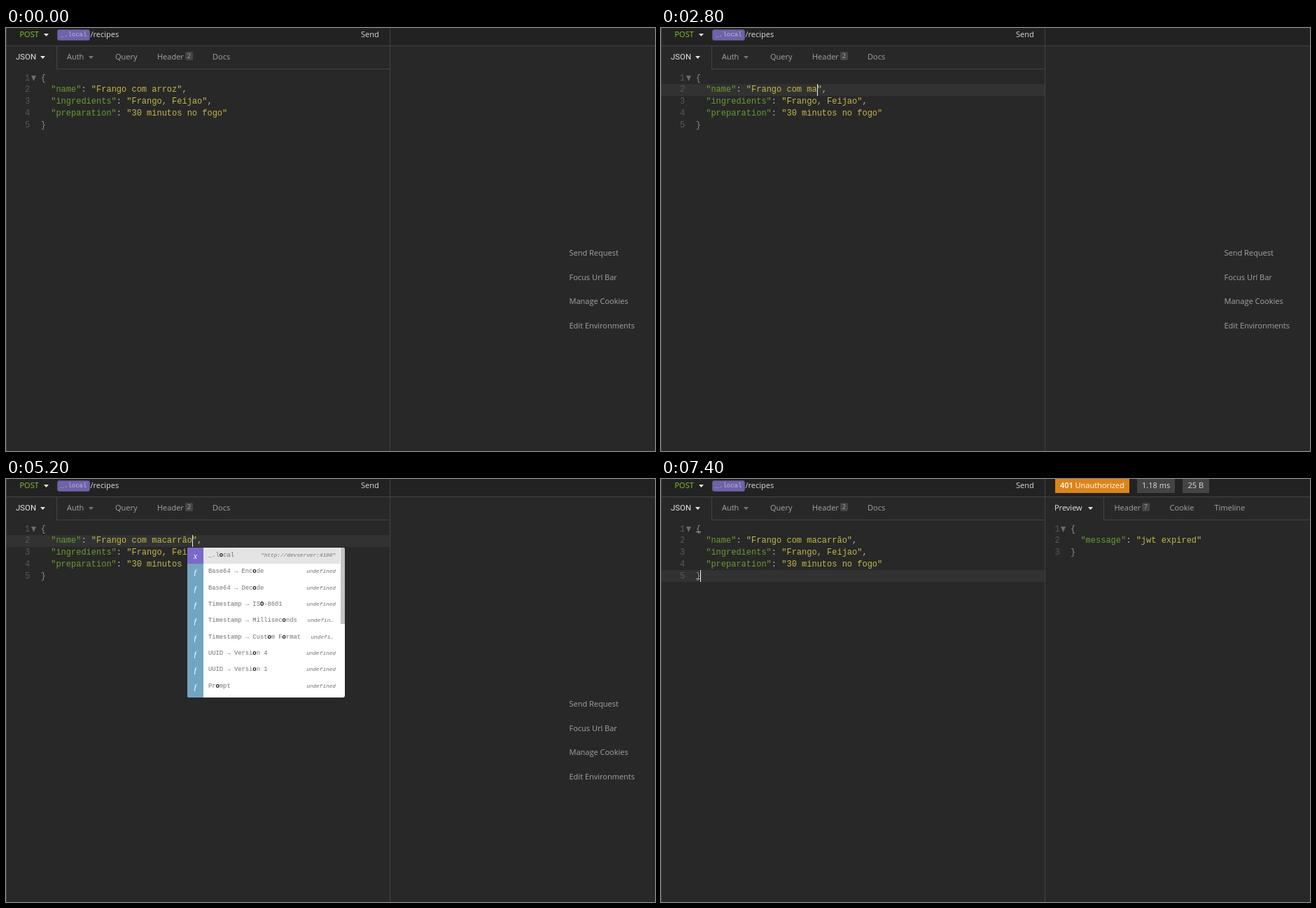
An HTML page for the animation above (8 s loop, 927 by 604 pixels).

```html
<!DOCTYPE html>
<html lang="en">
<head>
<meta charset="utf-8">
<title>Request editor</title>
<style>
html, body { margin: 0; width: 100%; height: 100%; overflow: hidden; background: #282828; }
body { position: relative; font: 11px/16px "Open Sans", "Noto Sans", sans-serif; color: #a4a4a4; }
.a, .t { position: absolute; white-space: pre; }
.top { top: 1px; color: #ddd; }
.tab { top: 33px; }
.fill { left: 0; top: 0; width: 927px; height: 604px; }
.rule { background: #444; }
.tab.lit, .lit { color: #e6e6e6; }
.caret { position: absolute; width: 7px; height: 4px; background: currentColor; clip-path: polygon(0 0, 100% 0, 50% 100%); }
.fold { position: absolute; top: 68px; width: 7px; height: 8px; background: #6c6c6c; clip-path: polygon(0 0, 100% 0, 50% 100%); }
.count { position: absolute; top: 34px; width: 11px; height: 12px; border-radius: 2px; background: #454545; color: #aaa; font-size: 8.5px; line-height: 12px; text-align: center; }
.pill { position: absolute; top: 0; height: 20px; background: #444; }

/* code */
.code, .nums { position: absolute; top: 63.6px; margin: 0; font: 12px/16.8px "Liberation Mono", monospace; color: #b4b4b4; white-space: pre; }
.code { left: 49.8px; }
.nums { left: 27px; color: #585858; }
.code b { font-weight: 400; color: #6a9c31; }
.code s { text-decoration: none; color: #c5b84a; }
.code u { text-decoration: none; color: #8c8c8c; }
.word { display: inline-block; position: relative; height: 16.8px; vertical-align: top; overflow: hidden; animation: type 8s step-end infinite; }
.word span { position: absolute; left: 0; top: 0; }
.row { left: 1px; width: 547px; height: 17px; background: #323232; }
.tag { left: 73px; top: 2px; width: 47px; height: 16px; box-sizing: border-box; border: 1px solid #5b5189; border-radius: 3px; background: #6f62a8; color: #bdb4dd; font: 9px/14px "Liberation Mono", monospace; text-align: center; }

/* suggestions */
.menu { position: absolute; left: 259px; top: 98px; width: 225px; height: 214px; overflow: hidden; border-radius: 3px; background: #fff; color: #707070; font: 8.8px/23.35px "Liberation Mono", monospace; }
.menu p { position: relative; margin: 0; height: 23.35px; padding-left: 30px; width: 188px; white-space: pre; }
.menu p::before { content: "ƒ"; position: absolute; left: 0; top: 0; width: 23px; height: 23.5px; background: #71a5c3; color: #fff; font: italic 12px/24px "Liberation Serif", serif; text-align: center; }
.menu p:first-child { background: #e4e4e4; }
.menu p:first-child::before { content: "x"; background: #7b68c8; }
.menu b { color: #111; }
.menu i { position: absolute; right: 6px; top: 0; font-size: 7.75px; }
.menu i.cut { right: 9px; }
.thumb { position: absolute; right: 0; top: 0; width: 6px; height: 109px; background: #c3c3c3; }

/* timeline: 1% = 80 ms */
.sel, .line2, .end, .menu, .hints, .reply, .late, .old, .new, .cursor { animation: 8s step-end infinite; }
.line2 { animation-name: line2; }
.sel { animation-name: sel; }
.old { animation-name: old; }
.new { animation-name: new; }
.menu { animation-name: menu; }
.hints { animation-name: hints; }
.reply { animation-name: reply; }
.late { animation-name: late; }
.end { animation-name: end; }
.cursor { width: 1px; height: 17px; background: #f0f0f0; animation-name: cursor; }
@keyframes line2 { 0%, 17.5%, 92.5%, 100% { opacity: 0 } 15%, 35% { opacity: 1 } }
@keyframes sel { 0%, 35%, 100% { opacity: 0 } 17.5% { opacity: 1 } }
@keyframes old { 0% { opacity: 1 } 35%, 100% { opacity: 0 } }
@keyframes new { 0% { opacity: 0 } 35%, 100% { opacity: 1 } }
@keyframes menu { 0%, 92.5%, 100% { opacity: 0 } 65% { opacity: 1 } }
@keyframes hints { 0% { opacity: 1 } 77.5%, 100% { opacity: 0 } }
@keyframes reply { 0% { opacity: 0 } 77.5%, 100% { opacity: 1 } }
@keyframes late { 0% { opacity: 0 } 82.5%, 100% { opacity: 1 } }
@keyframes end { 0% { opacity: 0 } 92.5%, 100% { opacity: 1 } }
@keyframes type {
  0% { width: 5ch } 35% { width: 2ch } 37.5% { width: 3ch } 40% { width: 4ch }
  42.5% { width: 5ch } 45% { width: 6ch } 47.5% { width: 7ch } 50%, 100% { width: 8ch }
}
@keyframes cursor {
  0% { left: 230px; top: 80px; opacity: 0 }
  15% { opacity: 1 } 17.5% { opacity: 0 }
  35% { left: 223px; opacity: 1 } 37.5% { left: 230px } 40% { left: 237px }
  42.5% { left: 244px } 45% { left: 252px } 47.5% { left: 259px } 50% { left: 266px }
  57.5%, 70%, 85% { opacity: 0 }
  62.5%, 75%, 90% { opacity: 1 }
  92.5%, 100% { left: 56px; top: 130px; opacity: 1 }
}
</style>
</head>
<body>
<div class="a" style="left:0;top:0;width:927px;height:25px;background:#222"></div>
<div class="a rule" style="left:0;top:25px;width:927px;height:1px"></div>
<div class="a rule" style="left:72px;top:58px;width:476px;height:1px"></div>
<div class="a rule" style="left:72px;top:26px;width:1px;height:33px"></div>
<div class="a rule" style="left:0;top:0;width:1px;height:604px"></div>
<div class="a rule" style="left:548px;top:0;width:1px;height:604px"></div>

<span class="t top" style="left:19.5px;color:#85c72a">POST</span>
<span class="caret lit" style="left:54px;top:8px"></span>
<span class="a tag">_.local</span>
<span class="t top" style="left:120.5px">/recipes</span>
<span class="t top" style="left:507px">Send</span>

<span class="t tab lit" style="left:14px;font-family:Roboto,sans-serif;font-size:11.4px">JSON</span>
<span class="caret lit" style="left:49px;top:40px"></span>
<span class="t tab" style="left:87px">Auth</span>
<span class="caret" style="left:118px;top:40px;color:#777"></span>
<span class="t tab" style="left:156px">Query</span>
<span class="t tab" style="left:216px">Header</span>
<span class="count" style="left:256px">2</span>
<span class="t tab" style="left:295px">Docs</span>

<div class="a row line2" style="top:80px"></div>
<div class="a row end" style="top:130px"></div>
<div class="a sel" style="left:208px;top:80px;width:37px;height:17px;background:#555"></div>
<pre class="nums">1
2
3
4
5</pre>
<span class="fold" style="left:36px"></span>
<pre class="code"><u>{</u>
  <b>"name"</b>: <s>"Frango com <span class="word"><span class="old">arroz</span><span class="new">macarrão</span></span>"</s>,
  <b>"ingredients"</b>: <s>"Frango, Feijao"</s>,
  <b>"preparation"</b>: <s>"30 minutos no fogo"</s>
<u>}</u></pre>
<div class="a end" style="left:50px;top:75px;width:7px;height:1px;background:#aaa"></div>
<div class="a end" style="left:50px;top:142px;width:7px;height:1px;background:#aaa"></div>
<div class="a cursor"></div>

<div class="menu">
<p>_.l<b>o</b>cal<i>"http://devserver:4100"</i></p>
<p>Base64 → Enc<b>o</b>de<i>undefined</i></p>
<p>Base64 → Dec<b>o</b>de<i>undefined</i></p>
<p>Timestamp → IS<b>O</b>-8601<i>undefined</i></p>
<p>Timestamp → Millisec<b>o</b>nds<i class="cut">undefin…</i></p>
<p>Timestamp → Cust<b>o</b>m F<b>o</b>rmat<i class="cut">undefi…</i></p>
<p>UUID → Versi<b>o</b>n 4<i>undefined</i></p>
<p>UUID → Versi<b>o</b>n 1<i>undefined</i></p>
<p>Pr<b>o</b>mpt<i>undefined</i></p>
<p></p>
<span class="thumb"></span>
</div>

<div class="a fill hints">
<span class="t" style="left:804.5px;top:313px">Send Request</span>
<span class="t" style="left:804.5px;top:348px">Focus Url Bar</span>
<span class="t" style="left:804.5px;top:382px">Manage Cookies</span>
<span class="t" style="left:804.5px;top:417px">Edit Environments</span>
</div>

<div class="a fill reply">
<span class="pill" style="left:563px;width:106px;background:#dc8419"></span>
<span class="t top" style="left:570px;color:#fff;font-weight:600">401</span>
<span class="t top" style="left:591.5px;color:#fff">Unauthorized</span>
<span class="pill" style="left:680px;width:54px"></span>
<span class="t top" style="left:687px">1.18 ms</span>
<span class="pill" style="left:745px;width:38px"></span>
<span class="t top" style="left:752.5px">25 B</span>
<span class="t tab lit" style="left:562px">Preview</span>
<span class="caret lit" style="left:610px;top:40px"></span>
<span class="t tab" style="left:647.5px">Header</span>
<span class="count" style="left:687px">7</span>
<span class="t tab" style="left:726.5px">Cookie</span>
<span class="t tab" style="left:790.5px">Timeline</span>
<div class="a rule" style="left:632px;top:26px;width:1px;height:33px"></div>
<div class="a rule" style="left:632px;top:58px;width:295px;height:1px"></div>
<pre class="nums" style="left:562.5px">1
2
3</pre>
<span class="fold late" style="left:571px"></span>
<pre class="code" style="left:585px"><u>{</u>
  <b>"message"</b>: <s>"jwt expired"</s>
<u>}</u></pre>
</div>
</body>
</html>
```
